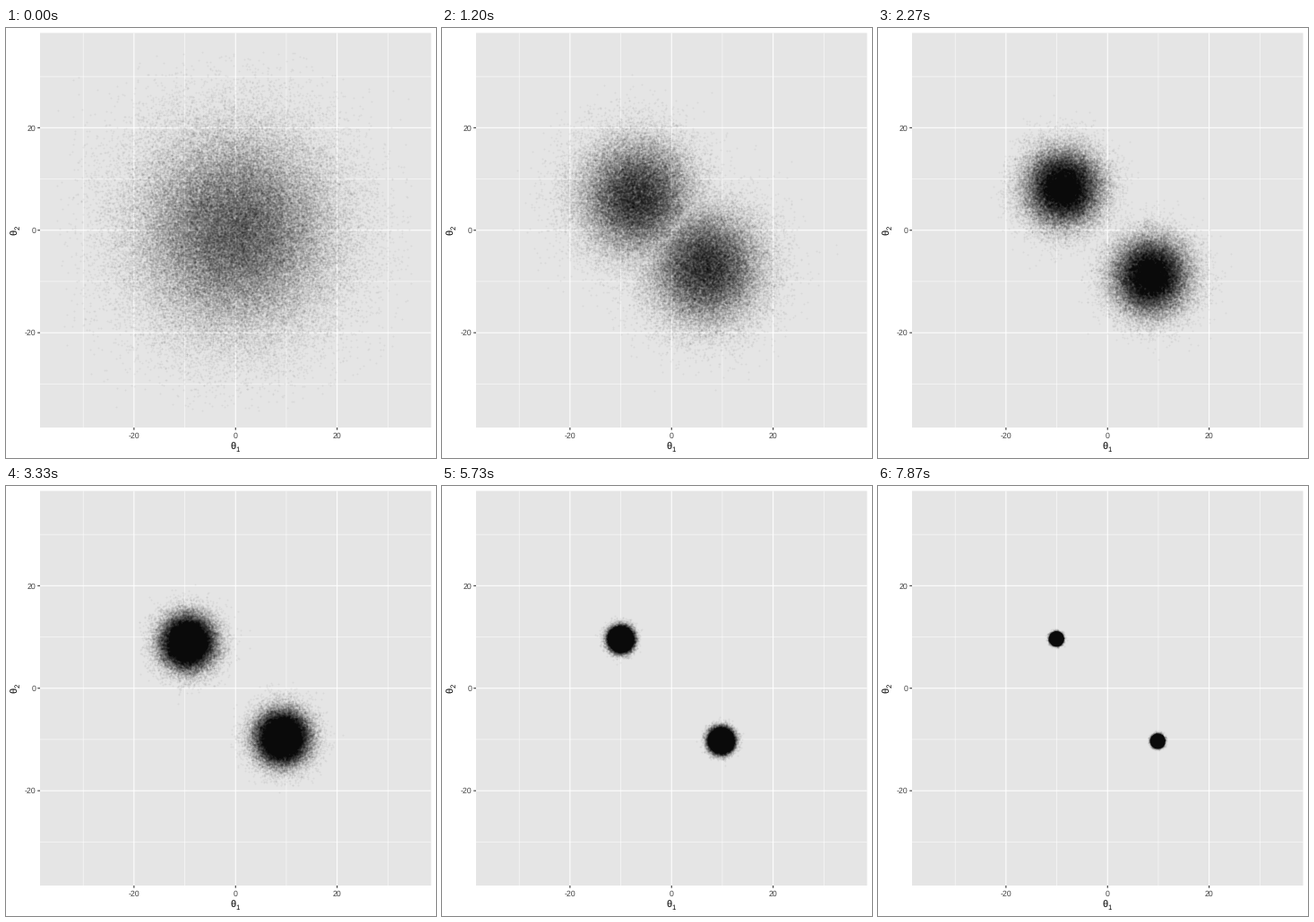
Recreate the animation shown at these times as a matplotlib script. Size 480 by 480 pixels, loop 8000 ms.

```python
import numpy as np
import matplotlib.pyplot as plt
from matplotlib.animation import FuncAnimation
from matplotlib.patches import Rectangle

plt.rcParams["text.hinting"] = "none"

SIZE, DPI = 480, 80
FRAMES, LOOP_MS = 60, 8000
PT = 72 / DPI  # points per pixel

LEFT, RIGHT, TOP, BOTTOM = 38, 474.5, 5.5, 446
LIMIT = 35
SPAN = 2.2 * LIMIT

N = 100000
PRIOR = 0.01  # precision of the wide starting Gaussian
MODES = np.array([[-10.0, 10.0], [10.0, -10.0]])


def px(x):
    return (LEFT + RIGHT) / 2 + x * (RIGHT - LEFT) / SPAN


def py(y):
    return (TOP + BOTTOM) / 2 - y * (BOTTOM - TOP) / SPAN


def precision(k):
    """Precision of each mode after k tempering steps."""
    return PRIOR * np.exp(0.1 * k + 0.26 * (1 - np.exp(-k / 4)))


def log_lik(p):
    return -0.5 * np.min([((p - m) ** 2).sum(axis=1) for m in MODES], axis=0)


def log_post(p, beta):
    return -0.5 * PRIOR * (p ** 2).sum(axis=1) + beta * log_lik(p)


def resample(p, log_w, rng):
    w = np.exp(log_w - log_w.max())
    cdf = np.cumsum(w) / w.sum()
    picks = (np.arange(N) + rng.random()) / N
    return p[np.minimum(np.searchsorted(cdf, picks), N - 1)]


def metropolis(p, beta, step, rng):
    new = p + step * rng.standard_normal(p.shape)
    gain = log_post(new, beta) - log_post(p, beta)
    accept = np.log(rng.random(N)) < gain
    return np.where(accept[:, None], new, p)


def sample_path():
    """Sequential Monte Carlo from the wide prior to the two narrow modes."""
    rng = np.random.default_rng(4)
    p = rng.standard_normal((N, 2)) / np.sqrt(PRIOR)
    path, beta = [p], 0.0
    for k in range(1, FRAMES):
        lam = precision(k)
        next_beta = lam - PRIOR
        p = resample(p, (next_beta - beta) * log_lik(p), rng)
        beta = next_beta
        if k > 1:  # the first step only reweights
            p = metropolis(p, beta, 1.2 / np.sqrt(lam), rng)
        path.append(p)
    return path


fig = plt.figure(figsize=(SIZE / DPI, SIZE / DPI), dpi=DPI, facecolor="white")
ax = fig.add_axes([0, 0, 1, 1])
ax.set_xlim(0, SIZE)
ax.set_ylim(SIZE, 0)
ax.axis("off")


def line(xs, ys, color, width):
    ax.plot(xs, ys, color=color, lw=width * PT, solid_capstyle="butt",
            snap=False, zorder=1)


def label(x, y, text, size, color, **kw):
    ax.text(x, y, text, fontsize=size * PT, color=color,
            family="Liberation Sans", **kw)


def title(x, y, index, angle):
    """Theta with a subscript, starting at the baseline point x, y."""
    kw = dict(rotation=angle, rotation_mode="anchor", ha="left", va="baseline")
    label(x, y, "θ", 11, "black", **kw)
    dx, dy = (6, 2) if angle == 0 else (2, -6)
    label(x + dx, y + dy, index, 7.7, "black", **kw)


ax.add_patch(Rectangle((LEFT, TOP), RIGHT - LEFT, BOTTOM - TOP,
                       fc="#e5e5e5", ec="none", snap=False, zorder=0))

for v in (-30, -10, 10, 30, -20, 0, 20):
    major = v % 20 == 0
    width = 1.07 if major else 0.53
    line([px(v)] * 2, [TOP, BOTTOM], "white", width)
    line([LEFT, RIGHT], [py(v)] * 2, "white", width)
    if major:
        line([px(v)] * 2, [BOTTOM, BOTTOM + 2.75], "#333333", 1.07)
        line([LEFT - 2.75, LEFT], [py(v)] * 2, "#333333", 1.07)
        label(px(v), 457.8, str(v), 8.8, "#404040", ha="center", va="baseline")
        label(33.2, py(v) + 3.2, str(v), 8.8, "#404040", ha="right", va="baseline")

title(250.4, 471, "1", 0)
title(13.5, 231, "2", 90)

path = sample_path()
dots, = ax.plot([], [], "o", ms=2 * PT, mew=0, color="#0a0a0a", alpha=0.05,
                zorder=3)


def update(k):
    p = path[k]
    x, y = p[(np.abs(p) <= LIMIT).all(axis=1)].T
    dots.set_data(px(x) - 1, py(y) + 1.5)
    return dots,


anim = FuncAnimation(fig, update, frames=FRAMES, interval=LOOP_MS / FRAMES,
                     repeat=True, repeat_delay=0, blit=False)
plt.show()
```
